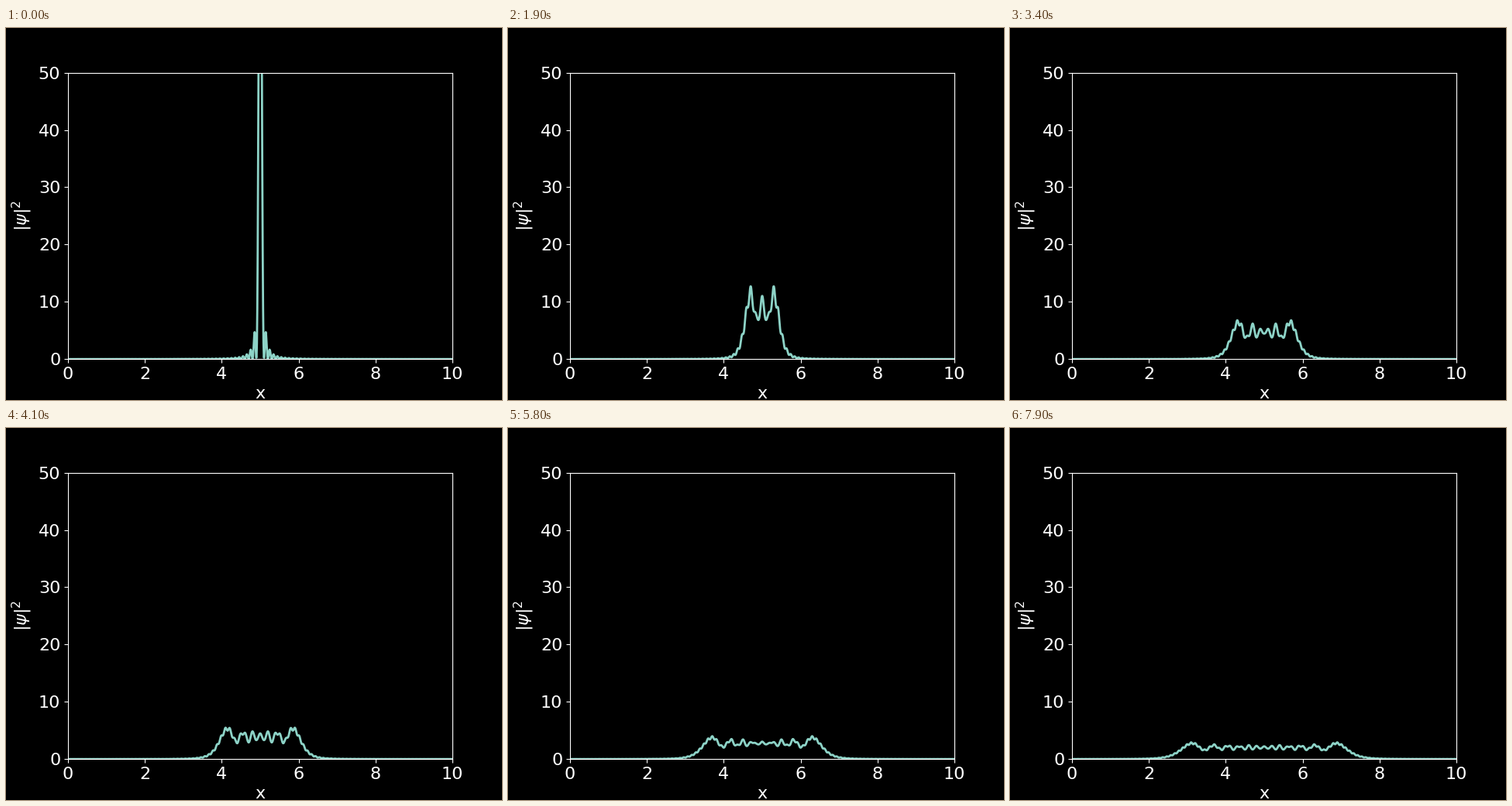
A matplotlib script for the animation above (8 s loop, 640 by 480 pixels).

```python
import matplotlib.pyplot as plt
import numpy as np
from matplotlib.animation import FuncAnimation

plt.style.use("dark_background")
plt.rcParams.update({"font.family": "DejaVu Sans", "font.size": 16})

L = 10.0      # width of the box
X0 = L / 2    # where the particle is localised
MODES = 100
DT = 0.001
FRAMES = 80

x = np.linspace(0, L, 1000)
k = np.arange(1, MODES + 1) * np.pi / L
modes = 2 / L * np.sin(k * X0) * np.sin(np.outer(x, k))


def density(t):
    """Probability density of the truncated delta state at time t."""
    return np.abs(modes @ np.exp(-0.5j * k**2 * t)) ** 2


fig, ax = plt.subplots(figsize=(6.4, 4.8), dpi=100)
line, = ax.plot(x, density(0), lw=2)
ax.set(xlim=(0, L), ylim=(0, 50), xlabel="x", ylabel=r"$|\psi|^2$")


def update(frame):
    line.set_ydata(density(frame * DT))
    return line,


anim = FuncAnimation(fig, update, frames=FRAMES, interval=100,
                     repeat=True, repeat_delay=0)
plt.show()
```
